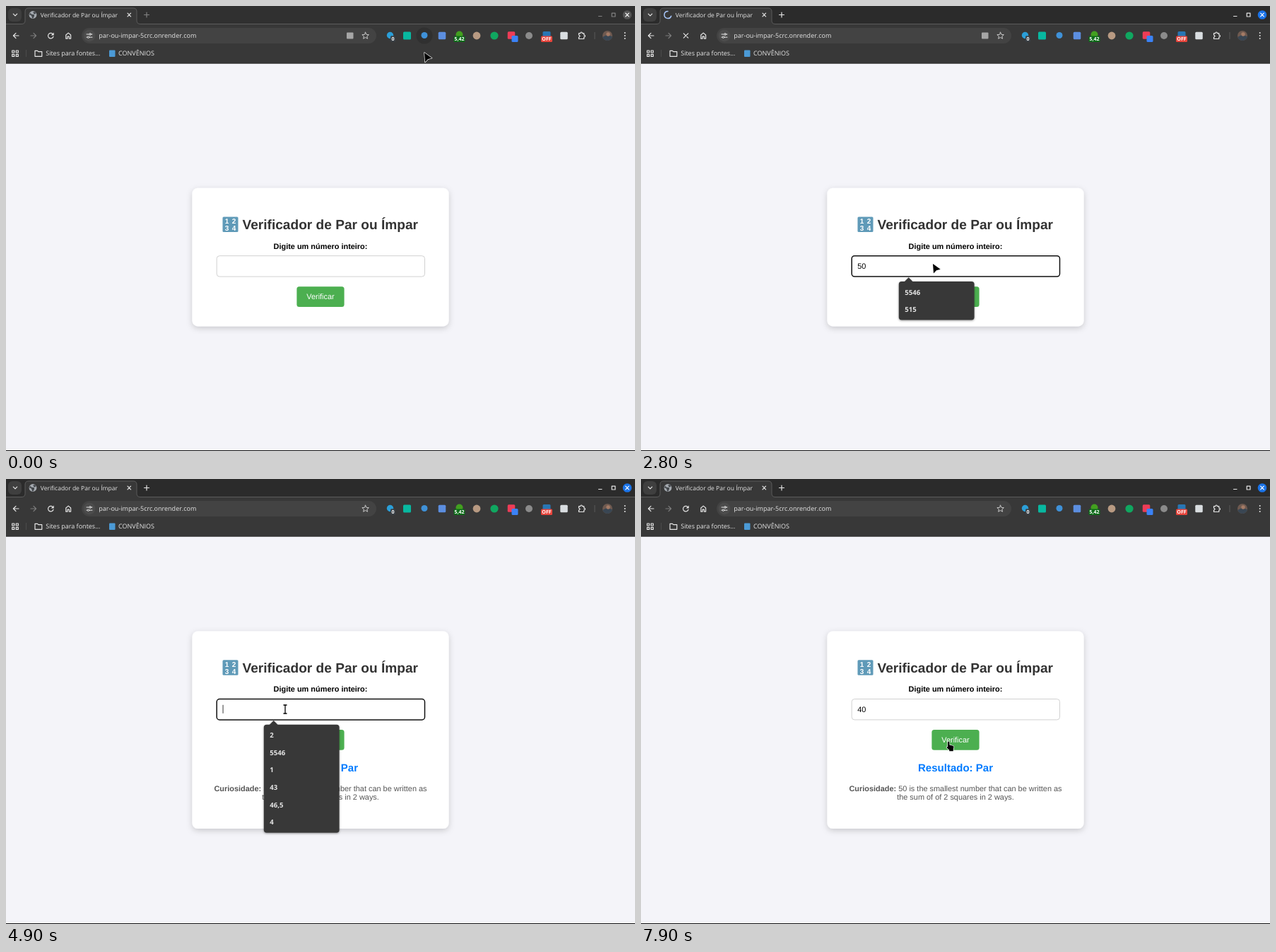
Animation of 890x630 px, one loop 8 s. Source, as an HTML page:

```html
<!DOCTYPE html>
<html lang="pt-BR">
<head>
<meta charset="utf-8">
<title>Verificador de Par ou Ímpar</title>
<style>
html, body { margin: 0; width: 100%; height: 100%; overflow: hidden; background: #f4f4f9; }
svg { display: block; width: 100%; height: 100%; }
text { text-rendering: geometricPrecision; white-space: pre; }
.ui { font-family: "Open Sans", "Noto Sans", sans-serif; fill: #e6e6e6; font-size: 9px; }
.page { font-family: "Liberation Sans", Arial, sans-serif; font-size: 10.93px; }
.b { font-weight: 700; }
.mid { text-anchor: middle; }
.line { fill: none; stroke: #e6e6e6; stroke-width: 1.2; stroke-linecap: round; stroke-linejoin: round; }
.badge { font-size: 7px; font-weight: 700; fill: #fff; }
</style>
</head>
<body>
<svg viewBox="0 0 890 630">
  <defs>
    <filter id="cardShadow" x="-10%" y="-10%" width="120%" height="125%">
      <feDropShadow dx="0" dy="2.7" stdDeviation="4" flood-color="#000" flood-opacity=".18"/>
    </filter>
    <filter id="popShadow" x="-10%" y="-10%" width="120%" height="130%">
      <feDropShadow dx="0" dy="1" stdDeviation="1.5" flood-color="#000" flood-opacity=".4"/>
    </filter>
    <clipPath id="face"><circle cx="851" cy="42" r="7"/></clipPath>
  </defs>

  <rect width="890" height="630" fill="#f4f4f9"/>

  <!-- browser frame -->
  <rect id="strip" width="890" height="26"/>
  <rect y="25" width="890" height="56.5" fill="#383838"/>
  <path d="M-1 25.5H22q5 0 5-5V8q0-5 5-5H180q5 0 5 5v12.500q0 5 5 5H891" fill="#383838" stroke="#666" stroke-width=".8"/>
  <rect y="80.700" width="890" height=".8" fill="#2e2e2e"/>
  <rect x="3" y="3" width="19" height="19" rx="6" fill="#3f3f3f"/>
  <path class="line" d="M10.300 11.200l2.700 2.700 2.700-2.700"/>

  <g id="globe">
    <circle cx="38" cy="12.500" r="5.400" fill="#a4a9af"/>
    <path d="M34 9.500q2 3 4.500 2.500t1 3.500l-1.500 2.500q-1.500-1-1.500-3T33 12.500zM38.500 8.500q3-1 4 1.500l-1.500 1.500q-2.500 0-2.500-3z" fill="#43474b"/>
  </g>
  <path id="spinner" d="M38 7.500A5 5 0 1 0 42.700 14.200" fill="none" stroke="#a8c7fa" stroke-width="1.500" stroke-linecap="round"/>
  <text class="ui" x="48.800" y="15.700" style="font-size:8.500px">Verificador de Par ou Ímpar</text>
  <path class="line" d="M172 10.200l4.600 4.600m0-4.600l-4.600 4.600"/>
  <g id="winButtons">
    <path class="line" d="M195.500 12.500h7M199 9v7M838.500 14.500h4.500M857.200 10.200h4.800v4.800h-4.800z"/>
  </g>
  <circle id="closeDot" cx="879" cy="12.500" r="6.300"/>
  <path class="line" style="stroke:#fff" d="M876.700 10.200l4.600 4.600m0-4.600l-4.600 4.600"/>

  <!-- toolbar -->
  <path class="line" d="M18 42h-7.500m3.500-3.600l-3.600 3.600 3.600 3.600"/>
  <path class="line" style="stroke:#7c7c7c" d="M35 42h7.500m-3.500-3.600l3.600 3.600-3.600 3.600"/>
  <g id="reload">
    <path class="line" d="M66.700 40.300A3.800 3.800 0 1 0 67 43.300"/>
    <path d="M67.700 37.500v4h-4z" fill="#e6e6e6"/>
  </g>
  <path id="stop" class="line" d="M60.300 38.800l6.400 6.400m0-6.400l-6.400 6.400"/>
  <path class="line" d="M84.800 41v5.200h2.200v-3h2.400v3h2.200V41l-3.400-2.900z"/>
  <rect x="107" y="31" width="417" height="22" rx="11" fill="#434343"/>
  <circle cx="118" cy="42" r="8.500" fill="#4c4c4c"/>
  <path class="line" style="stroke-width:1" d="M114 40h3m3.600 0h1.400M114 44.200h1m3.500 0h3.500"/>
  <circle class="line" style="stroke-width:1" cx="119" cy="40" r="1.300"/>
  <circle class="line" style="stroke-width:1" cx="116.500" cy="44.200" r="1.300"/>
  <text class="ui" x="131.300" y="45.200">par-ou-impar-5crc.onrender.com</text>
  <rect id="translate" x="482" y="37.500" width="9.500" height="9" rx="1" fill="#a6a6a6"/>
  <path id="star" class="line" style="stroke:#c8c8c8;stroke-width:1"/>
  <circle id="hover" cx="592" cy="42" r="11.500" fill="#303030"/>
  <g id="extensions"></g>
  <path class="line" d="M810.500 38.700h2.300q0-1.700 1.300-1.700t1.300 1.700h2.400v2.500q1.700 0 1.700 1.300t-1.700 1.300v2.700h-7.300v-2.400q1.500-.2 1.500-1.500t-1.500-1.500z"/>
  <path d="M833 37v10" stroke="#595959"/>
  <g clip-path="url(#face)">
    <rect x="844" y="35" width="14" height="14" fill="#6f5a50"/>
    <path d="M844 44l6-3 8 2v6h-14z" fill="#394653"/>
    <circle cx="852" cy="40" r="2.700" fill="#a47b66"/>
  </g>
  <path d="M875.700 38v.01m0 3.990v.01m0 3.990v.01" stroke="#e6e6e6" stroke-width="2" stroke-linecap="round"/>

  <!-- bookmarks -->
  <path class="line" d="M8.700 63h3v3h-3zm5.600 0h3v3h-3zm-5.600 5.400h3v3h-3zm5.600 0h3v3h-3z"/>
  <path d="M28.500 62v10" stroke="#4c4c4c"/>
  <path class="line" d="M41 63.300h3.500l1.300 1.400h5v6.600H41z"/>
  <text class="ui" x="56.200" y="70.300">Sites para fontes…</text>
  <rect x="146" y="62.500" width="8.500" height="9.500" rx="1" fill="#4b9ad6"/>
  <text class="ui" x="159" y="70.300">CONVÊNIOS</text>

  <!-- page -->
  <g id="content" class="page">
    <rect id="card" x="263.500" y="257.700" width="363" rx="8" fill="#fff" filter="url(#cardShadow)"/>
    <rect x="306.500" y="298.500" width="22" height="21.500" rx="1.500" fill="#5f9ab8"/>
    <g class="b mid" fill="#fff" style="font-size:10px">
      <text x="312.500" y="308.400">1</text><text x="322.500" y="308.400">2</text>
      <text x="312.500" y="318.300">3</text><text x="322.500" y="318.300">4</text>
    </g>
    <text class="b" x="334.500" y="316" fill="#333" style="font-size:19.130px">Verificador de Par ou Ímpar</text>
    <text class="b mid" x="445" y="343.700" fill="#000">Digite um número inteiro:</text>
    <rect id="field" x="298.200" y="353.700" width="294.300" height="29.400" rx="4" fill="#fff"/>
    <text id="typed" x="306.300" y="372" fill="#000"></text>
    <rect id="caret" y="362" width=".9" height="12" fill="#222"/>
    <rect x="411.400" y="397.300" width="67.200" height="28.700" rx="3.500" fill="#4caf50"/>
    <text class="mid" x="445" y="415.200" fill="#fff">Verificar</text>
    <g id="result">
      <text class="b mid" x="445" y="456.600" fill="#007bff" style="font-size:15.030px">Resultado: Par</text>
      <g class="mid" fill="#555">
        <text x="445" y="483.900"><tspan class="b">Curiosidade:</tspan> 50 is the smallest number that can be written as</text>
        <text x="445" y="496.300">the sum of of 2 squares in 2 ways.</text>
      </g>
    </g>
    <g id="popup">
      <g filter="url(#popShadow)" fill="#383838">
        <rect id="popBox" x="364.800" y="390" width="106.800" rx="4"/>
        <path d="M372.500 390.500l6.200-6.300 6.200 6.300z"/>
      </g>
      <g id="popItems"></g>
    </g>
  </g>
  <rect y="629" width="890" height="1" fill="#111"/>

  <g id="cursor" stroke-linejoin="round">
    <path id="arrow" d="M0 0L10.700 7.700 5 9.300 1 13.500z" fill="#000" stroke="#fff" stroke-width="1.300" paint-order="stroke"/>
    <g id="beam" fill="none">
      <path d="M-2.500-6H2.500M0-6V6M-2.500 6H2.500" stroke="#fff" stroke-width="2.600" opacity=".8"/>
      <path d="M-2.500-6H2.500M0-6V6M-2.500 6H2.500" stroke="#000" stroke-width="1.300"/>
    </g>
    <path id="hand" d="M0 1.500Q1.200 .2 2.500 1.500V5.500L7.500 6.800Q8.700 7.200 8.500 8.500L7.800 12V14.300H2.200V12.800L-1.500 9.300Q-1.800 7.800 0 8.300z" fill="#000" stroke="#fff" stroke-width="1.300" paint-order="stroke"/>
  </g>
</svg>

<script>
const LOOP = 8000;
const NS = "http://www.w3.org/2000/svg";
const $ = id => document.getElementById(id);
const show = (id, on) => { $(id).style.display = on ? "" : "none"; };

function add(parent, tag, attrs, label) {
  const el = document.createElementNS(NS, tag);
  for (const key in attrs) el.setAttribute(key, attrs[key]);
  if (label) el.textContent = label;
  parent.append(el);
}

function buildStar() {
  const points = [];
  for (let i = 0; i < 10; i++) {
    const r = i % 2 ? 2.3 : 5, a = i * Math.PI / 5 - Math.PI / 2;
    points.push((508.6 + r * Math.cos(a)).toFixed(2) + " " + (42.2 + r * Math.sin(a)).toFixed(2));
  }
  $("star").setAttribute("d", "M" + points.join("L") + "Z");
}

function buildExtensions() {
  const box = $("extensions");
  const dot = (x, y, r, fill) => add(box, "circle", { cx: x, cy: y, r, fill });
  const square = (x, y, w, h, fill) =>
    add(box, "rect", { x: x - w / 2, y: y - h / 2, width: w, height: h, rx: 1.5, fill });
  const badge = (x, y, w, fill, label) => {
    square(x, y, w, 8.5, fill);
    add(box, "text", { x, y: y + 2.6, class: "ui badge mid" }, label);
  };
  dot(543.5, 41.5, 4.7, "#2b9fd8");
  badge(547.5, 46.5, 7, "#3a4046", "0");
  square(567.5, 42, 11, 11, "#08b8a0");
  dot(592, 41.5, 4.5, "#3f91d8");
  square(617, 42, 10.5, 10.5, "#5c8ee0");
  dot(641.5, 40.5, 5, "#43a020");
  badge(641.5, 46.8, 16, "#0d6b18", "5,42");
  dot(666, 42, 5.4, "#b89a82");
  dot(691, 42, 5.6, "#10a760");
  square(715, 41.5, 10.5, 10.5, "#ee3c57");
  square(720, 46.5, 9, 9, "#3b82f6");
  dot(740, 42, 5, "#8b8b8b");
  square(765, 40, 11, 8, "#2876b4");
  badge(765, 46.8, 16, "#e8453c", "OFF");
  square(789.5, 42, 10.5, 10.5, "#d9dde0");
}

// Pointer path: [ms, x, y]
const path = [
  [0, 592, 66], [800, 413, 365], [3500, 413, 365], [4200, 395, 326],
  [5000, 395, 326], [5500, 479, 264], [6900, 479, 264], [7100, 699, 338],
  [7300, 699, 338], [7800, 453, 371], [7900, 434, 371], [8000, 434, 371]
];

function pointerAt(t) {
  const i = path.findIndex((p, k) => k && t <= p[0]);
  const [t0, x0, y0] = path[i - 1], [t1, x1, y1] = path[i];
  const u = (t - t0) / (t1 - t0), e = u * u * (3 - 2 * u);
  return [x0 + (x1 - x0) * e, y0 + (y1 - y0) * e];
}

const within = (x, y, l, t, r, b) => x >= l && x <= r && y >= t && y <= b;

function pointerKind(x, y, t) {
  if (t >= 2400 && t < 3200) return "arrow";
  const py = t >= 3100 ? y + 42 : y;
  if (within(x, py, 411, 397, 479, 426)) return "hand";
  const overText = within(x, py, 298, 353, 593, 383) ||
    within(x, py, 335, 299, 584, 320) || within(x, py, 378, 334, 511, 346);
  return overText ? "beam" : "arrow";
}

const recent = ["2", "5546", "1", "43", "46,5", "4"];
// Form states: [from ms, focused, typed, suggestions]
const form = [
  [0, false, "", []],
  [1100, true, "", recent],
  [1900, true, "5", ["5546", "515"]],
  [2000, true, "50", ["5546", "515"]],
  [3100, false, "", []],
  [4900, true, "", recent],
  [6100, true, "4", ["43", "46,5", "4", "400"]],
  [6200, true, "40", ["400"]],
  [7300, false, "40", []]
];
const caretOn = [[1100, 1600], [1900, 2400], [4900, 5400], [6100, 6800]];
let shownList = null;

function drawPopup(items) {
  show("popup", items.length);
  if (items === shownList) return;
  shownList = items;
  $("popBox").setAttribute("height", 5.4 + 24.6 * items.length);
  $("popItems").replaceChildren();
  items.forEach((label, i) =>
    add($("popItems"), "text", { x: 373.3, y: 408.5 + 24.6 * i, class: "ui b", style: "font-size:9.6px" }, label));
}

function drawForm(t) {
  const [, focused, typed, items] = form.findLast(s => t >= s[0]);
  const field = $("field");
  field.setAttribute("stroke", focused ? "#101010" : "#ccc");
  field.setAttribute("stroke-width", focused ? 1.5 : 0.9);
  $("typed").textContent = typed;
  $("caret").setAttribute("x", 306.6 + 6.08 * typed.length);
  show("caret", caretOn.some(([a, b]) => t >= a && t < b));
  drawPopup(items);
}

function draw(time) {
  const t = Math.floor(time % LOOP / 100) * 100;
  const active = t >= 1100, loading = t >= 2400 && t < 3200, done = t >= 3100;

  $("strip").setAttribute("fill", active ? "#2b2b2b" : "#303030");
  $("winButtons").setAttribute("opacity", active ? 1 : 0.45);
  $("closeDot").setAttribute("fill", active ? "#1a73e8" : "#555");
  show("hover", t < 200);
  show("globe", !loading);
  show("reload", !loading);
  show("spinner", loading);
  show("stop", loading);
  show("translate", !done);
  $("spinner").setAttribute("transform", `rotate(${(t - 2800) * 0.36} 38 12.5)`);

  $("content").setAttribute("transform", `translate(0 ${done ? -42.2 : 0})`);
  $("card").setAttribute("height", done ? 279.5 : 195.7);
  show("result", done);
  drawForm(t);

  const [x, y] = pointerAt(t), kind = pointerKind(x, y, t);
  $("cursor").setAttribute("transform", `translate(${x.toFixed(1)} ${y.toFixed(1)})`);
  for (const id of ["arrow", "beam", "hand"]) show(id, id === kind);
}

buildStar();
buildExtensions();
const start = performance.now();
function tick() {
  draw(performance.now() - start);
  requestAnimationFrame(tick);
}
tick();
</script>
</body>
</html>
```
